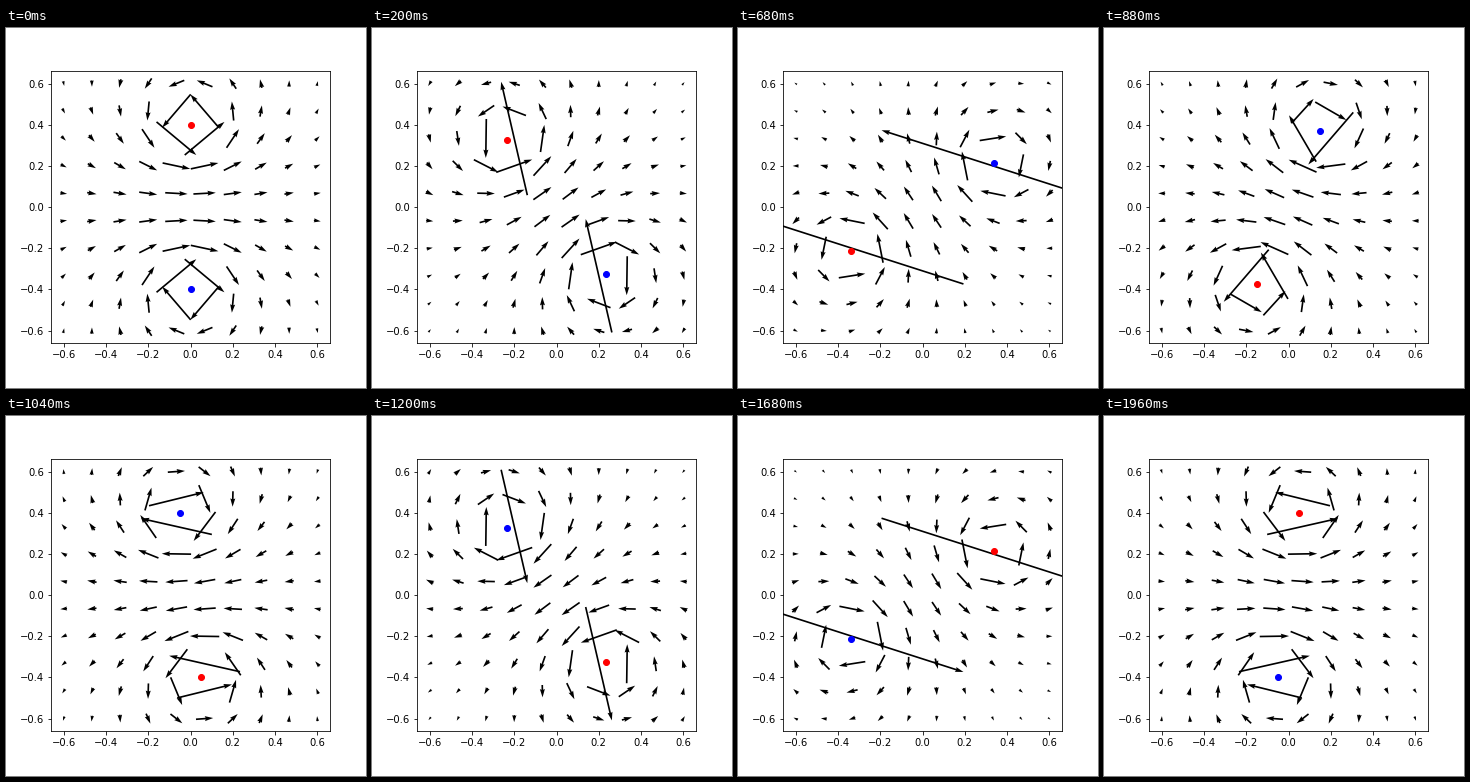
Write a matplotlib script that moves like this. It is 360x360 px and loops after 2000 ms.

```python
import numpy as np
import matplotlib.pyplot as plt
from matplotlib.animation import FuncAnimation

FRAMES = 50
INTERVAL = 40
RADIUS = 0.4
LIMIT = 0.66

axis = np.linspace(-0.6, 0.6, 10)
X, Y = np.meshgrid(axis, axis)


def wire_positions(i):
    """Two opposite wires circling the origin counter-clockwise."""
    a = 2 * np.pi * i / FRAMES
    p = RADIUS * np.array([-np.sin(a), np.cos(a)])
    return p, -p


def wire_field(pos, current):
    """Field of a straight wire, falling off as 1/r."""
    dx, dy = X - pos[0], Y - pos[1]
    r2 = dx**2 + dy**2
    return current * np.array([-dy, dx]) / r2


def total_field(i):
    out, into = wire_positions(i)
    return wire_field(out, 1) + wire_field(into, -1)


fig, ax = plt.subplots(figsize=(5, 5), dpi=72)
fig.subplots_adjust(left=0.125, right=0.9, bottom=0.125, top=0.88)
ax.set(xlim=(-LIMIT, LIMIT), ylim=(-LIMIT, LIMIT))
ticks = np.linspace(-0.6, 0.6, 7).round(1)
ax.set_xticks(ticks)
ax.set_yticks(ticks)

arrows = ax.quiver(X, Y, *total_field(0), pivot="mid")
red, = ax.plot([], [], "ro")
blue, = ax.plot([], [], "bo")


def update(i):
    arrows.scale = None  # autoscale again for every step
    arrows.set_UVC(*total_field(i))
    for dot, (x, y) in zip((red, blue), wire_positions(i)):
        dot.set_data([x], [y])
    return arrows, red, blue


anim = FuncAnimation(fig, update, frames=FRAMES, interval=INTERVAL,
                     repeat=True, repeat_delay=0)
plt.show()
```
